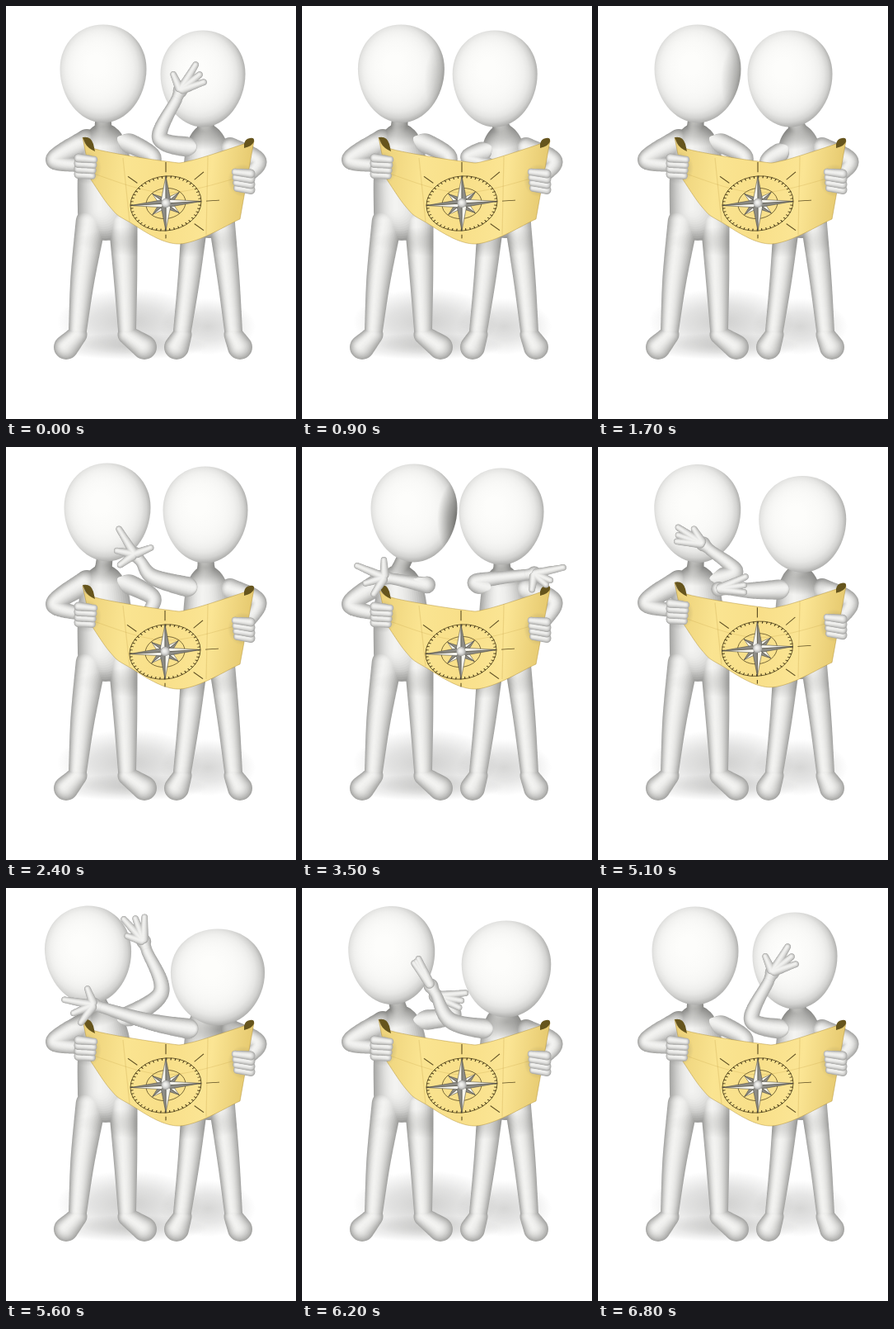
These frames come from a looping animation (352 by 500 pixels, 6900 ms). An HTML page with a canvas:

```html
<!DOCTYPE html>
<html>
<head>
<meta charset="utf-8">
<style>
html, body { margin: 0; height: 100%; overflow: hidden; background: #fff; }
canvas { display: block; }
</style>
</head>
<body>
<canvas id="stage" width="352" height="500"></canvas>
<script>
const ctx = document.getElementById('stage').getContext('2d');
const LOOP = 6900, STEP = 100, LAYERS = 14, TAU = Math.PI * 2, DEG = TAU / 360;

// Arms: elbow and wrist, then finger aim, fan between fingers and thumb offset in degrees
const arm = (elbow, wrist, aim, fan, thumb) => ({ elbow, wrist, aim, fan, thumb });
const tucked = arm([178, 182], [170, 204], 120, 10, 30);
const pointing = arm([151, 167], [112, 160], -157, -40, 65);

// Heads: x, y, tilt; drop: how far the map hangs down
const poses = {
  A: { drop: 0, headL: [118, 82, 0], headR: [239, 88, 0], armL: tucked,
       armR: arm([187, 160], [207, 113], -59, 20, -55) },
  B: { drop: 0, headL: [121, 82, 0], headR: [233, 88, 0], armL: tucked,
       armR: arm([206, 188], [216, 206], 60, 20, -30) },
  C: { drop: 1, headL: [123, 79, 0], headR: [242, 82, 0], armL: tucked,
       armR: arm([180, 158], [164, 139], -122, -47, 100) },
  D: { drop: 1, headL: [136, 80, 0], headR: [242, 84, 0], armL: pointing,
       armR: arm([212, 163], [270, 155], -12, 55, 34) },
  E: { drop: 1, headL: [136, 80, 0], headR: [242, 83, 0], armL: pointing,
       armR: arm([198, 182], [187, 192], 80, 50, -40) },
  F: { drop: 0, headL: [100, 81, -.08], headR: [257, 108, 0],
       armL: arm([188, 127], [171, 76], -132, 22, -30),
       armR: arm([175, 162], [118, 145], -170, -32, 59) }
};
const order = 'ABBCCDDEEFA';
const times = [400, 1100, 1700, 2400, 2800, 3500, 3900, 4300, 4700, 5600, 6800];

// Blends numbers, arrays and objects alike
function mix(a, b, u) {
  if (typeof a === 'number') return a + (b - a) * u;
  if (Array.isArray(a)) return a.map((v, i) => mix(v, b[i], u));
  return Object.fromEntries(Object.keys(a).map(k => [k, mix(a[k], b[k], u)]));
}

function poseAt(t) {
  let i = 0;
  while (i < times.length - 2 && t > times[i + 1]) i++;
  const x = Math.min(1, Math.max(0, (t - times[i]) / (times[i + 1] - times[i])));
  return mix(poses[order[i]], poses[order[i + 1]], x * x * (3 - 2 * x));
}

const polar = (r, a, [x, y] = [0, 0]) => [x + r * Math.cos(a), y + r * Math.sin(a)];

// Catmull-Rom samples through points of any dimension
function spline(pts) {
  const out = [], last = pts.length - 1;
  for (let i = 0; i < last; i++) {
    const a = pts[Math.max(0, i - 1)], b = pts[i], c = pts[i + 1], d = pts[Math.min(last, i + 2)];
    const n = Math.max(2, Math.ceil(Math.hypot(c[0] - b[0], c[1] - b[1]) / 1.6));
    for (let k = i ? 1 : 0; k <= n; k++) {
      const s = k / n;
      out.push(b.map((v, j) => v + .5 * s * (c[j] - a[j] +
        s * (2 * a[j] - 5 * v + 4 * c[j] - d[j] + s * (3 * (v - c[j]) + d[j] - a[j])))));
    }
  }
  return out;
}

// Gives points an evenly changing radius
const taper = (r0, r1, ...pts) => pts.map((p, i) => [...p, mix(r0, r1, i / (pts.length - 1))]);

// Rounded tubes of [x, y, radius], merged and shaded from the rim inwards;
// fade blends the start into whatever lies below
function tubes(list, fade = 0) {
  const chains = list.map(spline);
  for (let k = 0; k < LAYERS; k++) {
    const u = k / LAYERS, g = Math.round(166 + 77 * (1 - (1 - u) ** 2));
    ctx.fillStyle = `rgb(${g},${g},${g - 2})`;
    ctx.beginPath();
    for (const chain of chains)
      chain.forEach(([x, y, r], i) => {
        const rk = r * (1 - u), cx = x - r * .22 * u, cy = y - r * .14 * u;
        if (i * 1.6 < fade * rk) return;
        ctx.moveTo(cx + rk, cy);
        ctx.arc(cx, cy, rk, 0, TAU);
      });
    ctx.fill();
  }
}

function soft(x, y, rx, ry, alpha, mode = 'source-atop') {
  ctx.save();
  ctx.globalCompositeOperation = mode;
  ctx.translate(x, y);
  ctx.scale(rx, ry);
  const g = ctx.createRadialGradient(0, 0, 0, 0, 0, 1);
  g.addColorStop(0, `rgba(70,70,66,${alpha})`);
  g.addColorStop(.5, `rgba(70,70,66,${alpha * .6})`);
  g.addColorStop(1, 'rgba(70,70,66,0)');
  ctx.fillStyle = g;
  ctx.fillRect(-1, -1, 2, 2);
  ctx.restore();
}

function head([x, y, tilt], rx, ry) {
  ctx.save();
  ctx.translate(x, y);
  ctx.rotate(tilt);
  ctx.scale(rx, ry);
  const g = ctx.createRadialGradient(-.18, -.2, .1, -.05, -.06, 1.07);
  for (let s = 0; s <= 1; s += .1) {
    const v = Math.round(253 - 20 * s * s - 62 * s ** 8);
    g.addColorStop(s, `rgb(${v},${v},${v - 2})`);
  }
  ctx.fillStyle = g;
  ctx.beginPath();
  ctx.moveTo(-1, -.1);
  ctx.bezierCurveTo(-1, -.62, -.56, -1, 0, -1);
  ctx.bezierCurveTo(.56, -1, 1, -.62, 1, -.1);
  ctx.bezierCurveTo(1, .48, .55, 1, 0, 1);
  ctx.bezierCurveTo(-.55, 1, -1, .48, -1, -.1);
  ctx.fill();
  ctx.restore();
}

function drawArm(shoulder, { elbow, wrist, aim, fan, thumb }) {
  const palm = polar(12, Math.atan2(wrist[1] - elbow[1], wrist[0] - elbow[0]), wrist);
  tubes([[...taper(13, 7, shoulder, elbow, wrist), [...palm, 9]]], 1.2);
  const finger = (turn, length) => taper(6, 3.8, palm, polar(length, (aim + turn) * DEG, palm));
  const short = 36 - .3 * Math.abs(fan);
  tubes([finger(0, 36), finger(fan, short), finger(2 * fan, short), finger(thumb, 21)], .8);
}

const torso = (x, [hx, hy], w) => [
  [(x + hx) / 2, hy + 50, 10], [x, 152, 12], [x + 1, 172, w * .8], [x + 2, 205, w * .97], [x + 3, 250, w]];

const leg = (hip, knee, ankle, toe, size) => [
  taper(18.5 * size, 11, [hip, 262], [knee, 330], [ankle, 393]),
  taper(11.5, 15, [ankle, 398], [toe, 413])];

function stroke(points, color, width) {
  ctx.beginPath();
  points.forEach(p => ctx.lineTo(p[0], p[1]));
  ctx.strokeStyle = color;
  ctx.lineWidth = width;
  ctx.stroke();
}

function compass(x, y) {
  ctx.save();
  ctx.transform(1, -.06, 0, .77, x, y);
  const ring = (r, width, dash = []) => {
    ctx.beginPath();
    ctx.arc(0, 0, r, 0, TAU);
    ctx.setLineDash(dash);
    ctx.lineWidth = width;
    ctx.strokeStyle = '#4a3d18';
    ctx.stroke();
    ctx.setLineDash([]);
  };
  ring(43, .9);
  ring(41.5, 3.5, [1.2, 4.23]);
  ring(24, .8);
  for (let i = -3; i <= 2; i++) {
    const a = i * TAU / 8;
    stroke([polar(49, a), polar(i === 2 ? 55 : 65, a)], '#5a4b20', 1.1);
  }
  for (let i = 0; i < 8; i++) {
    const major = i > 3, a = (i + (major ? 0 : .5)) * TAU / 4;
    for (const side of [-1, 1]) {
      ctx.beginPath();
      [[0, 0], polar(major ? 43 : 23, a), polar(8, a + side * TAU / 8)].forEach(p => ctx.lineTo(...p));
      ctx.closePath();
      ctx.fillStyle = side < 0 ? '#f6f5ee' : '#8d8c86';
      ctx.fill();
      ctx.strokeStyle = '#45433c';
      ctx.lineWidth = .6;
      ctx.stroke();
    }
  }
  ctx.restore();
  tubes([taper(5.5, 5.5, [x, y - .5], [x + .2, y - .5])]);
}

function chart(drop) {
  const lower = (pts, dy) => spline(pts.map(([x, y]) => [x, y + dy * drop]));
  const top = lower([[93, 159], [108, 173], [194, 188], [225, 187], [301, 163]], 9);
  const bottom = lower([[284, 258], [210, 288], [147, 260], [126, 243], [103, 210]], 5);
  const g = ctx.createLinearGradient(93, 190, 300, 215);
  ['#ecd179', '#fae491', '#f8df89', '#fbe594', '#e4c76c'].forEach((c, i) => g.addColorStop(i / 4, c));
  ctx.beginPath();
  [...top, ...bottom].forEach(p => ctx.lineTo(...p));
  ctx.closePath();
  ctx.fillStyle = g;
  ctx.fill();
  ctx.strokeStyle = 'rgba(176,142,52,.6)';
  ctx.lineWidth = .8;
  ctx.stroke();
  const fold = 'rgba(190,155,65,.25)', dy = 8 * drop;
  stroke([[142, 184 + dy], [150, 261 + dy / 2]], fold, 1.2);
  stroke([[245, 182 + dy], [243, 277 + dy / 2]], fold, 1.2);
  stroke(lower([[103, 202], [194, 226], [292, 205]], 8), fold, 1);
  ctx.fillStyle = '#66551d';
  ctx.fill(new Path2D(`M93 ${159 + dy}q10 -2 13 8l2 9q-9 -4 -12 -10z
    M289 ${167 + dy}q1 -6 7 -7q6 -1 5 4q-1 5 -12 8z`));
  compass(194 - drop, 239 + 9 * drop);
}

function grip(x, y, dir) {
  soft(x, y + 10, 18, 20, .3);
  for (let i = 3; i >= 0; i--)
    tubes([taper(5.5, 4.2, [x - 10 * dir, y + i * 6.5 - 2 * dir], [x + (9 - i * .8) * dir, y + i * 6.5])]);
}

function draw(t) {
  const { drop, headL, headR, armL, armR } = poseAt(t);
  const limbs = [[[138, 161], armL], [[232, 172], armR]];
  const arms = inFront => limbs.forEach(([shoulder, a]) => {
    if (a.wrist[1] < 175 === inFront) drawArm(shoulder, a);
  });
  ctx.clearRect(0, 0, 352, 500);
  soft(150, 382, 88, 40, .26, 'source-over');
  soft(245, 388, 58, 34, .22, 'source-over');
  soft(150, 412, 95, 16, .22, 'source-over');

  tubes([torso(118, headL, 34), ...leg(103, 93, 87, 73, 1), ...leg(142, 145, 147, 168, .95),
    taper(14, 8, [98, 163], [59, 186 + 4 * drop], [90, 193 + 9 * drop])]);
  soft(headL[0], headL[1] + 64, 44, 24, .38);
  tubes([torso(243, headR, 31), ...leg(229, 222, 214, 207, .86), ...leg(262, 270, 276, 284, .86),
    taper(13, 8, [272, 172], [306, 188], [288, 210 + 8 * drop])]);
  soft(headR[0], headR[1] + 64, 42, 22, .38);
  soft(195, 285, 110, 20, .2);

  head(headL, 52.5, 59.5);
  const closeness = Math.min(1, Math.max(0, (118 - headR[0] + headL[0]) / 12));
  soft(headL[0] + 54, headL[1] + 8, 26, 48, .65 * closeness);
  head(headR, 51.5 + Math.max(0, headR[1] - 88) * .28, 58.5);

  arms(false);
  chart(drop);
  arms(true);
  grip(98, 186 + 9 * drop, 1);
  grip(287, 201 + 9 * drop, -1);
}

let shown = -1;
function tick(now) {
  const t = Math.floor(now % LOOP / STEP) * STEP;
  if (t !== shown) draw(shown = t);
  requestAnimationFrame(tick);
}
tick(performance.now());
</script>
</body>
</html>
```
